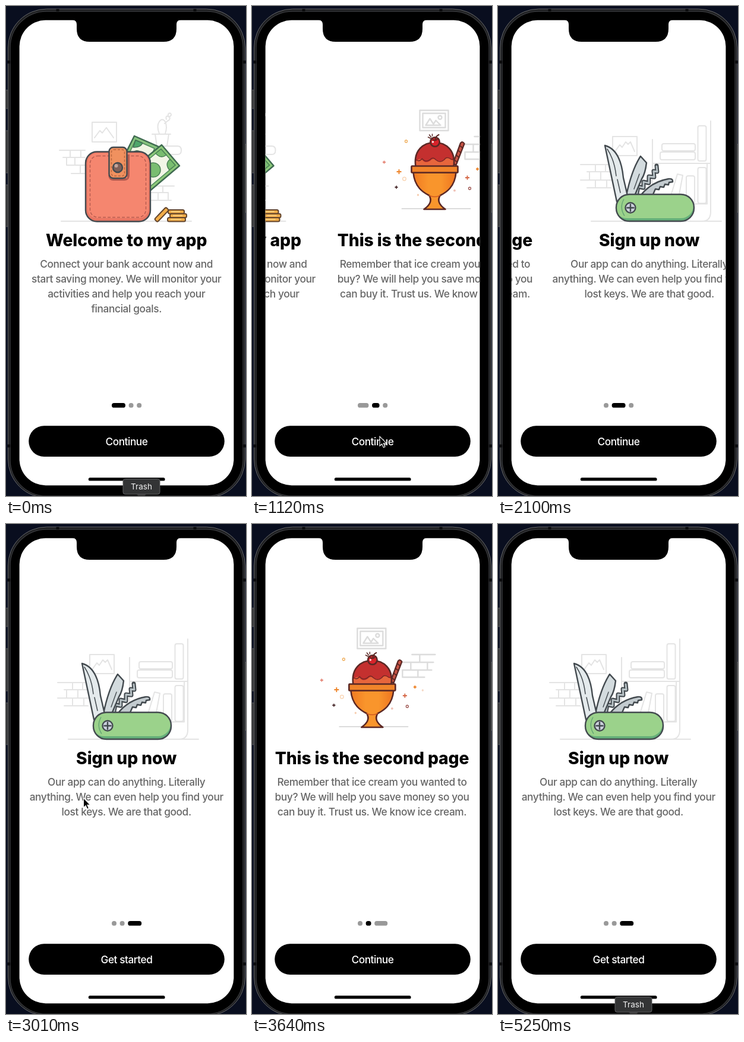
Animation, 404 px wide and 822 px high, one loop 5950 ms. Source, as an HTML page:

```html
<!DOCTYPE html>
<html lang="en">
<head>
<meta charset="utf-8">
<title>Onboarding</title>
<style>
  html, body { margin: 0; width: 100%; height: 100%; overflow: hidden; background: #090e1f; }
  svg { display: block; width: 404px; height: 822px; }
  text { font-family: Inter, "Open Sans", sans-serif; font-optical-sizing: none; text-anchor: middle; }
  .title { font-size: 28.2px; font-weight: 800; letter-spacing: -.003em; }
  .body { font-size: 17.3px; font-weight: 500; letter-spacing: -.022em; fill: #666; }
  .label { font-size: 17.3px; font-weight: 500; letter-spacing: -.027em; fill: #fff; }
  .tip { font-size: 13.6px; fill: #f2f2f2; }
  .line { fill: none; stroke: #e4e4e4; stroke-width: 2; stroke-linejoin: round; stroke-linecap: round; }
  .ink { stroke: #434a4f; stroke-width: 2.4; stroke-linejoin: round; stroke-linecap: round; }
  .choc { stroke: #5b2825; stroke-width: 2.6; stroke-linejoin: round; stroke-linecap: round; }
  .none { fill: none; }
</style>
</head>
<body>
<svg viewBox="0 0 404 822">
  <defs>
    <clipPath id="screen"><rect x="22.600" y="23.800" width="360.800" height="780.400" rx="44"/></clipPath>
    <clipPath id="noteClip"><path d="M262 233L292 268L240 312L209 276z"/></clipPath>
    <clipPath id="handleClip"><rect x="147" y="316" width="131" height="45" rx="22"/></clipPath>
    <clipPath id="scoopClip"><path d="M171 269C167 242 184 229 203 229S239 242 235 269z"/></clipPath>
    <linearGradient id="cup"><stop offset="0" stop-color="#f07a22"/><stop offset=".35" stop-color="#f9952c"/><stop offset=".65" stop-color="#f9952c"/><stop offset="1" stop-color="#ee7420"/></linearGradient>
  </defs>

  <!-- phone body -->
  <rect width="404" height="822" fill="#090e1f"/>
  <g fill="#333436" stroke="#606164" stroke-width=".8">
    <rect x="-2" y="141" width="6" height="31"/>
    <rect x="-2" y="209" width="6" height="71"/>
    <rect x="-2" y="300" width="6" height="70"/>
    <rect x="402" y="232" width="5" height="114"/>
  </g>
  <rect x="3.5" y="5" width="399" height="820" rx="65" fill="#1d1e20" stroke="#68696c"/>
  <rect x="7" y="9" width="392" height="813" rx="61" stroke="#36373a" stroke-width="1.4"/>
  <path d="M3 94h4M3 738h4M399 94h4M399 738h4M87 5v4M318 5v4" stroke="#0b0b0c" stroke-width="5"/>

  <g clip-path="url(#screen)">
    <rect x="22" y="23" width="362" height="782" fill="#fff"/>

    <!-- wallet -->
    <g class="page">
      <path class="line" d="M93 361H312M145 195h41v33h-41zM149 221l9-12 4 4 7-9 12 17M246 215h31M251 215l3 20h17l3-20M258 214q-5-13 0-20 5-7 10 0 4 9 0 20M267 197l6-5M270 190q-2-6 3-5 5 2 1 7M273 185q-1-6 4-5 3 4-3 6M236 249h53q6 0 6-7t-6-7h-46M90 242h43M96 254h37M90 242h35M103 267h30M110 281h23M108 242v12M126 242v12M116 254v13M102 254v13h15M125 267v14M250 302h33M245 313h28M245 326h33M264 302v11M273 313v13M256 313v13"/>
      <g class="ink">
        <path fill="#85c27d" stroke="#3f6a51" d="M216 218L259 237L238 291L190 270z"/>
        <path fill="#f0f6e4" stroke="#4f8a5b" stroke-width="1.5" d="M218 225L250 239L232 279L199 265z"/>
        <path fill="#4fa66b" stroke="#3f6a51" stroke-width="1.4" d="M218 225l12 5q-4 8-16 7zM233 250q-14-15-24 1v20h20z"/>
        <path fill="#8cc879" stroke="#3f6a51" d="M262 233L292 268L240 312L209 276z"/>
        <path fill="#f2f6e6" stroke="#4f8a5b" stroke-width="1.5" d="M261 240L285 267L240 305L216 277z"/>
        <g clip-path="url(#noteClip)" stroke="#4b8255" stroke-width="1.5" fill="#79bd70">
          <circle cx="248" cy="275" r="12"/>
          <path d="M252 247l9-7 9 10q-10 7-18-3zM285 267l-9-10q-9 8-1 18z"/>
        </g>
      </g>
      <rect class="ink" x="134" y="244.5" width="109" height="117" rx="19" fill="#e77562"/>
      <rect x="137" y="247" width="103" height="109" rx="16" fill="#f5866f"/>
      <rect x="141.5" y="251.5" width="94" height="103" rx="13" class="none" stroke="#b75c50" stroke-width="1.5" stroke-dasharray="5 3"/>
      <path d="M172 284q1 9 9 9h18q8 0 9-8V249h-4v40z" fill="#b45b4f"/>
      <rect class="ink" x="173.500" y="237" width="30" height="52" rx="7" fill="#f0915f"/>
      <rect x="177.500" y="241" width="22" height="44" rx="4" class="none" stroke="#b9653f" stroke-width="1.4" stroke-dasharray="4 2.5"/>
      <circle class="ink" cx="188" cy="271" r="8" fill="#806058"/>
      <circle cx="185.500" cy="268" r="3" fill="#c3a59b"/>
      <g fill="#f2ad48" stroke="#63452d" stroke-width="2">
        <rect x="-14" y="-3.500" width="28" height="7" rx="2.500" transform="translate(262 350) rotate(-46)"/>
        <rect x="273" y="342" width="27" height="6.500" rx="2.500"/>
        <rect x="276" y="348.500" width="28" height="6.500" rx="2.500"/>
        <rect x="272" y="355" width="30" height="6.500" rx="2.500"/>
      </g>
      <path d="M278 345h15M281 351.500h16M277 358h18" stroke="#ffd386" stroke-width="1.500"/>
    </g>

    <!-- ice cream -->
    <g class="page">
      <g class="line" stroke-linecap="butt" style="stroke:#dcdcdc;stroke-width:2.400">
        <path d="M178 175h48v34h-48zM183 180h38v24h-38zM188 200l7-11 6 9 4-6 8 8zM270 219h39M254 232h52M254 245h49M254 257h37M283 219v13M268 232v13M296 232v13M254 245v12M280 245v12"/>
        <circle cx="212" cy="187" r="3"/>
        <path d="M148 340H263" stroke-width="2"/>
      </g>
      <g class="choc">
        <path fill="#c95445" stroke-width="2.200" d="M234 264L246.500 230Q250 226 253 231L239 267z"/>
        <path class="none" stroke-width="1.800" d="M245 234l5 4M242 242l5 4M239 250l5 4M236 258l5 4"/>
        <g clip-path="url(#scoopClip)" stroke="none">
          <rect x="165" y="225" width="75" height="46" fill="#e7663c"/>
          <path fill="#c4302f" d="M165 225h76v30q-6 8-12 1-6-4-10 2-7 6-14 0-5-4-10 2-8 5-13-2-5-4-10 2-4 2-7-2z"/>
        </g>
        <path class="none" stroke="#7a2725" stroke-width="1.500" d="M172 258q5 4 10-2 5 7 13 2 5-6 10 0 7 6 14 0 4-6 10-2 3 3 6 0"/>
        <path class="none" d="M171 269C167 242 184 229 203 229S239 242 235 269"/>
        <path fill="url(#cup)" d="M167 279C169 304 184 313 194 318Q201 330 185 341H221Q205 330 212 318C222 313 237 304 239 279z"/>
        <path class="none" stroke="#d35b20" stroke-width="1.500" d="M194 318q9 4 18 0"/>
        <rect x="164" y="268.500" width="78" height="11" rx="1" fill="#f0842a"/>
        <circle cx="203.500" cy="228" r="7.800" fill="#d8232a"/>
        <path class="none" stroke-width="2" d="M204 224q1-6 6-8M200 224q3 3 7 0"/>
        <path class="none" stroke-width="1.500" d="M192 220l4 2M194 216l3 4M199 215v3"/>
        <circle cx="200" cy="228" r="1.600" fill="#fff" stroke="none"/>
      </g>
      <g id="sparks" fill="none"></g>
    </g>

    <!-- pocket knife -->
    <g class="page">
      <path class="line" d="M105 361H324M141 219h41v32h-41zM145 244l8-11 4 4 6-9 4 4 4-4 7 16M208 224V316M208 264H306M306 193V345Q306 361 292 361M300 264V332H279M250 332l9-48-9-2-10 33M87 266h48M98 278h42M87 292h52M98 305h40M112 266v12M129 266v12M102 278v14M121 278v14M112 292v13M131 292v13"/>
      <g class="line">
        <rect x="284.500" y="201" width="14" height="59" rx="3"/>
        <rect x="224" y="231" width="56" height="12" rx="3"/>
        <rect x="221" y="245" width="59" height="13" rx="3"/>
        <rect x="265" y="285" width="14" height="46" rx="3"/>
        <rect x="284.500" y="271" width="14" height="60" rx="3"/>
      </g>
      <g class="ink" fill="#d3dbde">
        <path fill="#c3cbcf" d="M188 318Q206 295 235 290Q243 289 242 295L236 296 235 300 229 299 227 304 221 303 219 308 213 307 209 316z"/>
        <path class="none" stroke-width="7" d="M182 314l2-11 9 2V295l9 2V286l9 1-1-10 6 1-1-10"/>
        <path class="none" stroke="#b9c3c7" stroke-width="2.800" d="M182 314l2-11 9 2V295l9 2V286l9 1-1-10 6 1-1-9"/>
        <path d="M188 252L198 263Q196 281 190 290L178 318H164Q173 275 188 252z"/>
        <path class="none" stroke-width="1.400" d="M186 282L177 307"/>
        <path fill="#e4eaec" d="M128 234C151 240 157 267 159 288L166 318 148 328z"/>
        <path class="none" stroke-width="1.500" d="M132 240Q144 258 147 285M149 291L154 313"/>
      </g>
      <g clip-path="url(#handleClip)">
        <rect x="146" y="315" width="133" height="47" fill="#65b079"/>
        <rect x="144" y="312" width="133" height="44" rx="21" fill="#9bd28b"/>
        <path class="none" stroke="#65a574" stroke-width="1.400" d="M160 324q-8 14 1 28"/>
      </g>
      <rect class="ink" x="147" y="316" width="131" height="45" rx="22" fill="none"/>
      <circle class="ink" cx="171" cy="338.500" r="8.500" fill="#cbd0dc" stroke-width="2"/>
      <path class="ink" d="M165.500 338.500h11M171 333v11" stroke-width="2"/>
    </g>

    <g id="dots"></g>
    <rect id="button" x="38.200" y="704.200" width="329.600" height="51.800" rx="25.900"/>
    <text id="label" class="label" x="203" y="736.800"></text>
    <rect x="138.800" y="791.300" width="128.800" height="5.200" rx="2.600"/>
  </g>

  <path d="M112 23q7 1 7 8v7q0 22 22 22H265q22 0 22-22V31q0-7 7-8z"/>

  <g id="tooltip">
    <path d="M220 819h16l-5 5h-6z" fill="#333"/>
    <rect x="197" y="793.500" width="62" height="25.500" rx="3.500" fill="#333435" stroke="#606163"/>
    <text class="tip" x="228" y="811">Trash</text>
  </g>
  <path id="cursor" d="M0 0V16L3.700 12.600 6.300 18.500 8.900 17.400 6.400 11.600H11.400z" stroke="#fff" stroke-width="1.100"/>
</svg>
<script>
const LOOP = 5950, PAGE = 360;
const $ = id => document.getElementById(id);

function add(parent, tag, attrs, text = "") {
  const el = document.createElementNS("http://www.w3.org/2000/svg", tag);
  for (const key in attrs) el.setAttribute(key, attrs[key]);
  el.textContent = text;
  return parent.appendChild(el);
}

const copy = [
  ["Welcome to my app", "Connect your bank account now and", "start saving money. We will monitor your",
    "activities and help you reach your", "financial goals."],
  ["This is the second page", "Remember that ice cream you wanted to",
    "buy? We will help you save money so you", "can buy it. Trust us. We know ice cream."],
  ["Sign up now", "Our app can do anything. Literally", "anything. We can even help you find your",
    "lost keys. We are that good."]
];
const pages = [...document.querySelectorAll(".page")];
pages.forEach((page, i) => copy[i].forEach((text, row) => add(page, "text", {
  class: row ? "body" : "title", x: 202.7, y: row ? 414.3 + row * 25 : 402.5
}, text)));

// x, y, half size, colour
[[143, 278, 4, "#ee8429"], [118, 262, 2.5, "#e68a7c"], [138.5, 304, 2.5, "#533638"],
 [258, 288, 3.5, "#d66a49"], [275, 273.5, 2.5, "#ee8429"]].forEach(([x, y, r, stroke]) =>
  add($("sparks"), "path", { d: `M${x - r} ${y}h${2 * r}M${x} ${y - r}v${2 * r}`, stroke, "stroke-width": 1.9 }));
[[155, 227, 2, "#efad59"], [152, 290, 2.8, "#f9d3b0"], [262, 306, 2, "#9d5551"],
 [236.5, 309.5, 1.2, "#ecb5a8"], [175, 317, 1, "#f6c9a9"], [288, 279, 1, "#f4d5c1"]].forEach(([cx, cy, r, stroke]) =>
  add($("sparks"), "circle", { cx, cy, r, stroke, "stroke-width": 1.3 }));

const dots = copy.map(() => add($("dots"), "rect", { y: 666, height: 7.8, rx: 3.9 }));

// at: pages start to slide; settle: the selected page changes
const moves = [
  { at: 1008, settle: 1020, step: 1, rate: 22 },
  { at: 1916, settle: 2260, step: 1, rate: 18.5 },
  { at: 3180, settle: 3604, step: -1, rate: 18.5 },
  { at: 4618, settle: 4618, step: 1, rate: 22 }
];
const presses = [[950, 1010], [4490, 4640]];

// time, x, y; one run per visible stretch
const trails = [
  [[130, 228, 822], [280, 270, 500], [420, 289, 230], [560, 289, 230], [840, 215, 722],
   [1150, 215, 722], [1540, 300, 604], [1900, 310, 560], [2060, 40, 520]],
  [[2300, 60, 500], [2720, 147, 470], [2945, 147, 470], [3010, 131, 460], [3075, 97, 442],
   [3190, 97, 442], [3400, 390, 470], [3500, 410, 480]],
  [[3800, 404, 545], [3850, 382, 557], [4100, 310, 757], [4350, 284, 732], [4640, 284, 732],
   [5040, 235, 796], [5180, 228, 824]]
];

const clamp = v => Math.min(1, Math.max(0, v));

// critically damped spring from 0 to 1
function spring(ms, rate) {
  const x = Math.max(0, ms) * rate / 1000;
  return 1 - (1 + x) * Math.exp(-x);
}

function cursorAt(t) {
  const run = trails.find(k => t >= k[0][0] && t < k[k.length - 1][0]);
  if (!run) return null;
  const i = run.findIndex(k => k[0] > t);
  const [t0, x0, y0] = run[i - 1], [t1, x1, y1] = run[i];
  const p = (t - t0) / (t1 - t0);
  return [x0 + (x1 - x0) * p, y0 + (y1 - y0) * p];
}

function draw(t) {
  let offset = 0, page = 0, from = 0;
  const weight = [1, 0, 0];
  for (const { at, settle, step, rate } of moves) {
    offset += step * spring(t - at, rate);
    const s = spring(t - settle, 11);
    weight[from] -= s;
    weight[from += step] += s;
    if (t >= settle) page = from;
  }
  pages.forEach((el, i) => el.setAttribute("transform", `translate(${((i - offset) * PAGE).toFixed(2)} 0)`));

  let x = 178;
  dots.forEach((dot, i) => {
    const width = 8 + 15 * weight[i];
    dot.setAttribute("x", x);
    dot.setAttribute("width", width);
    dot.setAttribute("fill", i === page ? "#000" : "#999");
    x += width + 5.6;
  });

  const press = Math.max(...presses.map(([a, b]) => t < a ? 0 : clamp(1 - (t - b) / 90)));
  const shade = Math.round(51 * press);
  $("button").setAttribute("fill", `rgb(${shade},${shade},${shade})`);
  const label = page === 2 ? "Get started" : "Continue";
  if ($("label").textContent !== label) $("label").textContent = label;

  $("tooltip").style.display = t < 130 || t >= 5170 ? "" : "none";
  const tip = cursorAt(t);
  $("cursor").style.display = tip ? "" : "none";
  if (tip) $("cursor").setAttribute("transform", `translate(${tip})`);
}

const start = performance.now();
function tick() {
  draw((performance.now() - start) % LOOP);
  requestAnimationFrame(tick);
}
tick();
</script>
</body>
</html>
```
